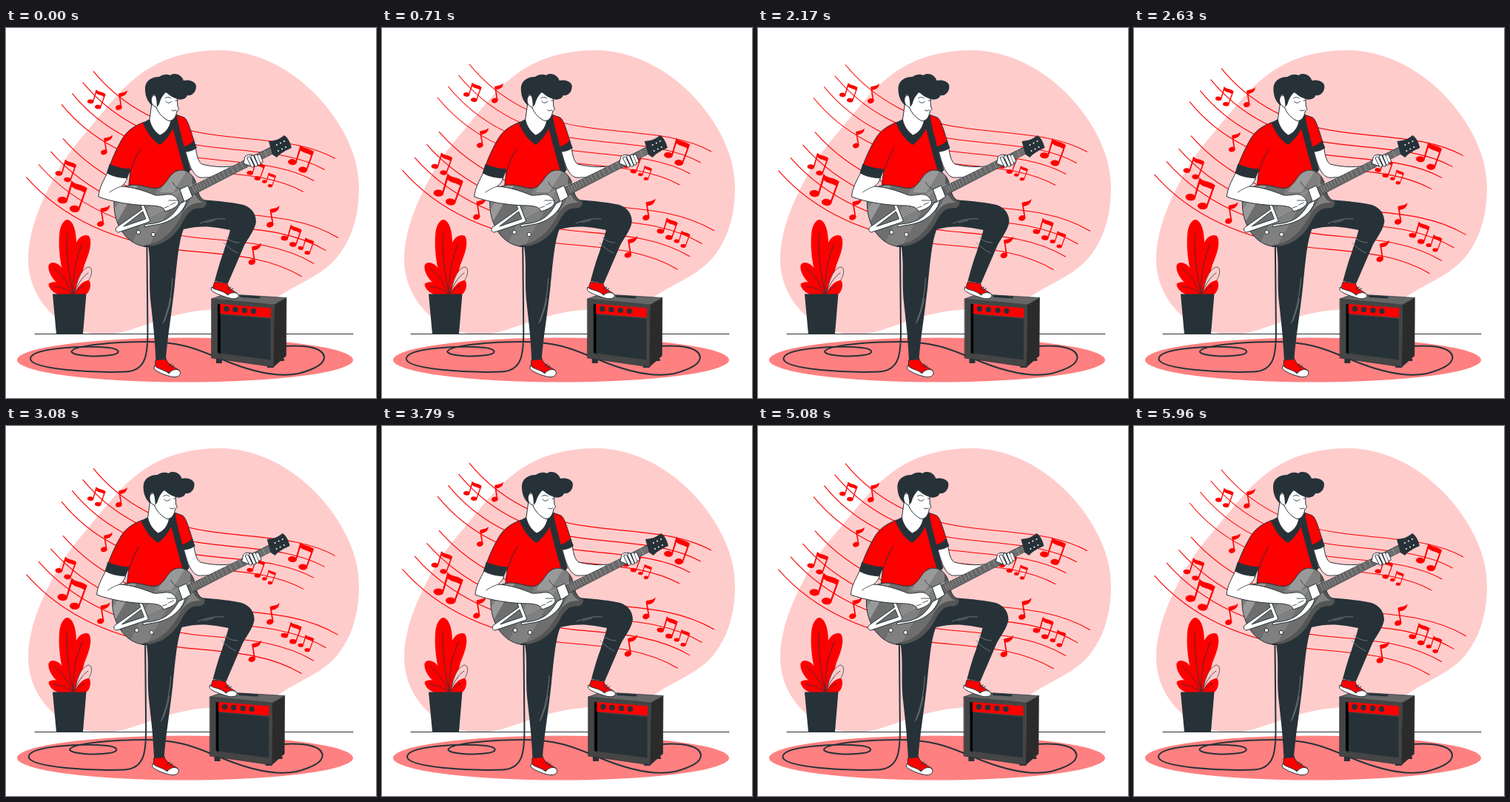
An HTML page that plays this animation: 500x500 px, repeating every 6000 ms.

```html
<!DOCTYPE html>
<html lang="en">
<head>
<meta charset="utf-8">
<title>Guitarist</title>
<style>
  html, body { margin: 0; width: 100%; height: 100%; overflow: hidden; background: #fff; }
  svg { display: block; width: 100vw; height: 100vh; }
  .ink { fill: #263238; }
  .red { fill: #f00; }
  .skin, .red.edge { stroke: #263238; stroke-width: 1; stroke-linejoin: round; }
  .skin { fill: #fff; }
  .line { fill: none; stroke: #263238; stroke-linecap: round; stroke-linejoin: round; }
  .fold { fill: none; stroke: #737c80; stroke-width: .9; stroke-linecap: round; }
</style>
</head>
<body>
<svg viewBox="0 0 500 500">
  <defs>
    <g id="pair">
      <ellipse cx="4.900" cy="19" rx="4.900" ry="3.300" transform="rotate(5 4.900 19)"/>
      <ellipse cx="16.600" cy="27.500" rx="4.900" ry="3.300" transform="rotate(5 16.600 27.500)"/>
      <path d="M8.200 19 L13.600 0 C17 4.500 23 3 28.800 7.500 L21.300 28 L19.800 27.600 L25.600 11.600 C21 8.500 17.500 9.500 13.800 6 L9.600 19.600Z"/>
    </g>
    <g id="single">
      <ellipse cx="4.900" cy="26.600" rx="4.900" ry="3.800" transform="rotate(-15 4.900 26.600)"/>
      <path d="M8 26.500 L4.600 5.500 C8 3.500 14 4.600 18 0 C18 6.500 13 9.500 7.200 10.200 L9.800 26.500Z"/>
    </g>
    <path id="body" d="M146 235C147 220 157 213 172 212C188 212 197 219 208 215.500C219 210 220 196 233 192.500C246 190 255 200 258 213C260 227 264 232 271 234C273 239 268 245 260 244C250 244 244 253 239 263C229 282 210 296 190 295.500C165 294 145 268 146 235Z"/>
    <clipPath id="bodyClip"><use href="#body"/></clipPath>
  </defs>

  <path fill="#fcc" d="M290 30C350 31 400 66 432 105C462 142 477 180 477 216C477 256 466 292 440 318C420 336 398 344 376 358C352 373 335 379 310 379.500C240 378 205 396 168 408C152 413 140 414 128 414C75 412 30 368 30 312C30 270 52 224 73 188C92 158 103 148 118 129C136 108 152 86 172 70C204 42 245 30 290 30Z"/>
  <ellipse cx="242" cy="448.500" rx="227" ry="30" fill="#ff8080"/>
  <path class="line" d="M39 413.500H469" stroke-width="1.200"/>

  <g id="plant">
    <path class="red" d="M90 360C78 345 70 310 72 280C73 265 79 259 83 259C90 260 95 272 95 290C99 281 107 278 112 281C118 290 111 308 106 320C102 335 99 347 94 360Z"/>
    <path class="red" d="M90 360C72 350 56 335 57.500 321C60 314 71 317 76 325C84 336 88 348 90 360Z"/>
    <path class="red" d="M90 360H70C63 357 58 352 57.500 346C66 338 82 348 90 360Z"/>
    <path d="M93 359C96 340 102 326 111 323C119 323 116 338 108 345C102 350 97 354 93 359Z" fill="#fcc" stroke="#263238" stroke-width=".7"/>
    <path class="red" d="M92 360C96 349 105 341 112 341C116 345 114 356 108 360Z"/>
    <path class="line" stroke-width=".8" d="M82 278C82 310 85 338 91 358M103 292C94 312 90 335 91 358M66 326C77 334 85 347 90 359M65 349C75 350 83 354 89 359M111 331C103 336 97 347 92 358M106 348C100 350 96 354 92 359"/>
    <path class="ink" d="M63 359.500H108.500L104 413.500H68Z"/>
  </g>

  <g id="music" class="red"></g>

  <g id="player">
    <path class="line" stroke-width="2" d="M190.500 294L191.500 405C192 440 190 463 162 464.500C122 466 34 462 33 447C34 432 105 429 139 432C155 434 156 440 142 442C122 445 91 443 88.500 437.500C90 428 155 424 190 424C240 424 262 436 290 447C330 464 366 473 395 467C418 461 431 453 430 444C428 432 405 428 376 430"/>

    <g id="amp">
      <path class="ink" d="M284 447H292V453H284ZM353 456H362V459H353ZM370 447H376V450H370Z"/>
      <path fill="#666" d="M278 366L296 359.500L379 364.500L362.500 374Z"/>
      <path fill="#2b2b2b" d="M362.500 374L379 364.500L378.500 443L361.500 458Z"/>
      <path fill="#454545" d="M278 366L362.500 374L361.500 458L278 446Z"/>
      <path fill="#000" d="M286 373L290 373.500V441L286 439Z"/>
      <path class="red" d="M289.500 373L358 378.500V391.500L289.500 386Z"/>
      <path class="ink" d="M290 387L357.500 393V448L290 439Z"/>
      <path class="line" d="M278 366L362.500 374L361.500 458L278 446ZM278 366L296 359.500L379 364.500L362.500 374M379 364.500L378.500 443L361.500 458M286 373V439L357.500 448" stroke="#1d2528" stroke-width=".7"/>
      <path class="line" d="M318 362.500L342 364" stroke-width="3"/>
      <g class="ink"><circle cx="298" cy="379.500" r="3.700"/><circle cx="310" cy="380.500" r="3.700"/><circle cx="322.500" cy="381.500" r="3.700"/><circle cx="334.500" cy="382.500" r="3.700"/></g>
    </g>

    <path class="red edge" d="M202 449L216 446C218 455 228 458 235 463L230 469L202 460Z"/>
    <path class="skin" d="M201 456C206 462 214 461 220 467C225 460 234 460 235.500 465C236 470 232 472 226 471.500C215 470 201 463 200 460Z"/>
    <path class="line" d="M220 457L224 454M223 459L227 456" stroke="#fff" stroke-width="1"/>
    <path class="red edge" d="M282 343L299 345C300 353 309 355 314 360L309 364L279 352Z"/>
    <path class="skin" d="M278 350C282 355 291 353 300 361C304 356 313 357 314.500 361C315 365 310 366.500 304 365.500C294 363 277 357 277.500 353Z"/>
    <path class="line" d="M299 353L304 350M302 355L307 352" stroke="#fff" stroke-width="1"/>

    <path class="ink" d="M192 293L230 232L264 232C290 234 309 236 321 239C333 243 338 252 338 262C336 274 327 284 322 294L300 345L282 342C286 327 290 313 294 303C298 289 301 282 303 273C286 270 267 265 240 272C233 290 231 320 228 348C224 385 218 420 216 448L202.500 449C201 415 198 393 195 365C193 337 196 318 192 293Z"/>
    <path class="fold" d="M225 338C224 360 219 383 212 399M223 366C221 379 217 388 214 396M262 264C274 259 286 257 296 258M270 263L282 260M298 283C303 288 309 290 315 290M294 290C301 297 306 301 313 304"/>

    <path class="skin" d="M242 164L256 160C258 174 260 181 265 184C280 188 304 190 322 183L326 188C300 198 275 203 262 202C250 198 246 178 242 164Z"/>

    <path class="red edge" d="M187 127C171 133 163 140 157 150C149 164 144 175 140 187L168 195L166 212C172 216 180 218 188 219L247 214C250 195 244 178 240 165L255 155C250 140 246 124 241 121L230 117L207 145Z"/>
    <path class="line" d="M182 163C175 174 172 184 168 195M240 165C239 156 238 150 236 144" stroke-width=".9"/>
    <path class="ink" d="M140 183.500C149 188 159 190 169 190.500L164 203C153 202 144 200 136 196ZM238 161C246 159 250 156 254 152L258 162C253 166 247 167 241 168Z"/>
    <path class="ink" d="M185 128L196 122L208 145L226 120L232 118C229 132 221 148 208 158C198 152 190 141 185 128Z"/>
    <path class="ink" d="M223 127L231 119C234 135 240 161 250 192L243 198C235 174 230 151 223 127Z"/>
    <path class="line" d="M229 134C232 152 237 171 244 190" stroke="#fff" stroke-width=".7"/>

    <path class="skin" d="M197 102L194 124C196 134 202 141 208 145C215 142 221 136 223 125L213 116Z"/>
    <path class="skin" d="M198 92C194 98 197 105 203 107C206 116 214 123 220 125.500C226 126 230 120 231 112C234 111 234 109 232 106L231.500 92L214 86Z"/>
    <path class="ink" d="M198 105C191 100 188 91 188 82C188 72 196 66 207 66C213 62 218 62 222 64C227 60 237 62 240 71C249 69 257 73 257 79C257 88 250 92 245 91C243 97 235 98 229 95C222 93 219 88 216 87C211 92 209 96 207 103L204 107C204 99 203 91 200 90C196 91 196 99 198 105Z"/>
    <path class="line" d="M216 99C218 102 222 102 224 99M215 95C217 93 221 93 223 95M229 98L231.500 98M224 111C226 112.500 229 112 230 110.500" stroke-width=".9"/>

    <g id="guitar">
      <use href="#body" fill="#808080"/>
      <g clip-path="url(#bodyClip)">
        <path fill="#6e6e6e" d="M140 262L180 205L208 212L166 300ZM190 300L234 222L252 220L214 300Z"/>
        <path fill="#999" d="M146 246L170 210L180 210L150 262ZM208 222L222 190H246L226 222Z"/>
        <path fill="#555" d="M252 198C250 216 255 231 266 236C249 235 241 244 235 257C223 279 207 291 188 293L200 300L280 245Z"/>
      </g>
      <use href="#body" class="line"/>
      <path class="line" stroke-width=".8" d="M225 208C228 214 232 217 236 218M250 225C248 235 242 241 238 249"/>

      <path fill="#4d4d4d" stroke="#263238" d="M239 220L360 160L364 168L244 230Z"/>
      <g id="frets" class="line" style="stroke:#a6a6a6" stroke-width=".6"></g>
      <g id="strings" class="line" style="stroke:#d0d0d0" stroke-width=".45"></g>
      <path class="ink" d="M355 153L362 152C368 151 372 148 376 145C380 147 384 153 386 162C379 165 371 169 366 175L360 171Z"/>
      <g id="pegs" fill="#fff"></g>

      <path class="skin" stroke-width=".8" fill-rule="evenodd" d="M182 239L186 238L195 261L191 263L152 276C148 276 147 271 150 269L184 245ZM185 248L159 268L189 258Z"/>
      <path class="skin" d="M235 218L246 213L252 228L241 235Z"/>
      <path class="skin" d="M187 266C194 264 200 265 208 262C218 259 225 253 230 246L236 237L244 233C243 244 230 257 217 262C205 267 196 266 188 269Z"/>
      <g class="skin"><circle cx="179" cy="276" r="2.700"/><circle cx="199" cy="279" r="2.700"/></g>
      <path class="line" d="M187 295H194" stroke="#fff" stroke-width="2"/>
    </g>

    <path class="skin" d="M137 196C145 201 154 202 164 203C162 208 160 211 156 214C172 215 187 220 202 226C211 227 219 223 226 226C232 230 235 235 232 239C228 244 221 246 215 248C214 242 207 241 199 240C172 240 143 235 125 228C126 216 132 206 137 196Z"/>
    <path class="line" d="M156 214C149 216 144 219 140 222M220 233L232 233M222 239L229 236M214 243L220 241" stroke-width=".8"/>

    <g id="fingers">
      <path class="skin" d="M321 183L323 174C326 170 333 171 337 173L333 177L328 178L331 187Z"/>
      <path class="line" stroke-width="5" d="M328 176L333 186M333 174L338 185M338 173L342 183M342 173L345 180"/>
      <path class="line" stroke-width="3.200" style="stroke:#fff" d="M328 176L333 186M333 174L338 185M338 173L342 183M342 173L345 180"/>
    </g>
  </g>
</svg>
<script>
const LOOP = 6000, BOB = 1500, LEAD = 40;
const shakeKeys = [0, -1, 2, -4, 4, -4, 4, -4, 2, -1, 0];
const el = id => document.getElementById(id);

// Each stave is one curve repeated along a diagonal.
const stave = (d, dx, dy) => [0, 1, 2, 3].map(i =>
  `<path d="${d}" transform="translate(${dx * i} ${dy * i})" fill="none" stroke="#f00" stroke-width="1.100"/>`).join('');
const note = (kind, [x, y, s]) =>
  `<use href="#${kind}" transform="translate(${x} ${y}) scale(${s})"/>`;

const pairs = [[110, 83.5, .86], [66.5, 178, 1], [69.5, 206.5, 1.4], [381, 158.5, 1.22],
  [325.5, 180, .86], [346, 195.5, .66], [371.5, 266, .98], [394.5, 283.5, .76]];
const singles = [[148, 84.5, .88], [128, 145, .88], [123, 239.5, .97], [352, 240.5, .97], [327.5, 291, .97]];

el('music').innerHTML =
  stave('M118 59C158 108 215 136 275 144C345 154 400 152 445 177', -14.3, 15) +
  stave('M77 150C140 222 230 242 289 249C349 255 402 256 449 284', -16.5, 17.4) +
  pairs.map(p => note('pair', p)).join('') +
  singles.map(p => note('single', p)).join('');

const line = (x1, y1, x2, y2) => `<path d="M${x1} ${y1}L${x2} ${y2}"/>`;
el('frets').innerHTML = Array.from({ length: 19 }, (_, i) => {
  const k = 1 - Math.pow(.94, i + 1), x = 358 - 154 * k, y = 161 + 76 * k;
  return line(x, y, x + 4, y + 8);
}).join('');
el('strings').innerHTML = Array.from({ length: 6 }, (_, i) =>
  line(184 + i * 1.5, 244 + i * 2.4, 360 + i * .8, 161.5 + i * 1.2)).join('');
el('pegs').innerHTML = [0, 1, 2].map(i =>
  `<circle cx="${366 + i * 5}" cy="${158 - i * 2.5}" r="1"/><circle cx="${368 + i * 5}" cy="${166 - i * 2.5}" r="1"/>`).join('');

function draw(ms) {
  const t = (ms + LEAD) % LOOP;
  const step = t / LOOP * 10, i = Math.floor(step);
  const x = shakeKeys[i] + (shakeKeys[i + 1] - shakeKeys[i]) * (step - i);
  const y = -10 * (1 - Math.abs(1 - 2 * (t % BOB) / BOB));
  el('player').setAttribute('transform', `translate(${x} 0)`);
  el('music').setAttribute('transform', `translate(0 ${y})`);
}

const start = performance.now();
function tick(now) {
  draw(Math.max(0, now - start));
  requestAnimationFrame(tick);
}
draw(0);
requestAnimationFrame(tick);
</script>
</body>
</html>
```
